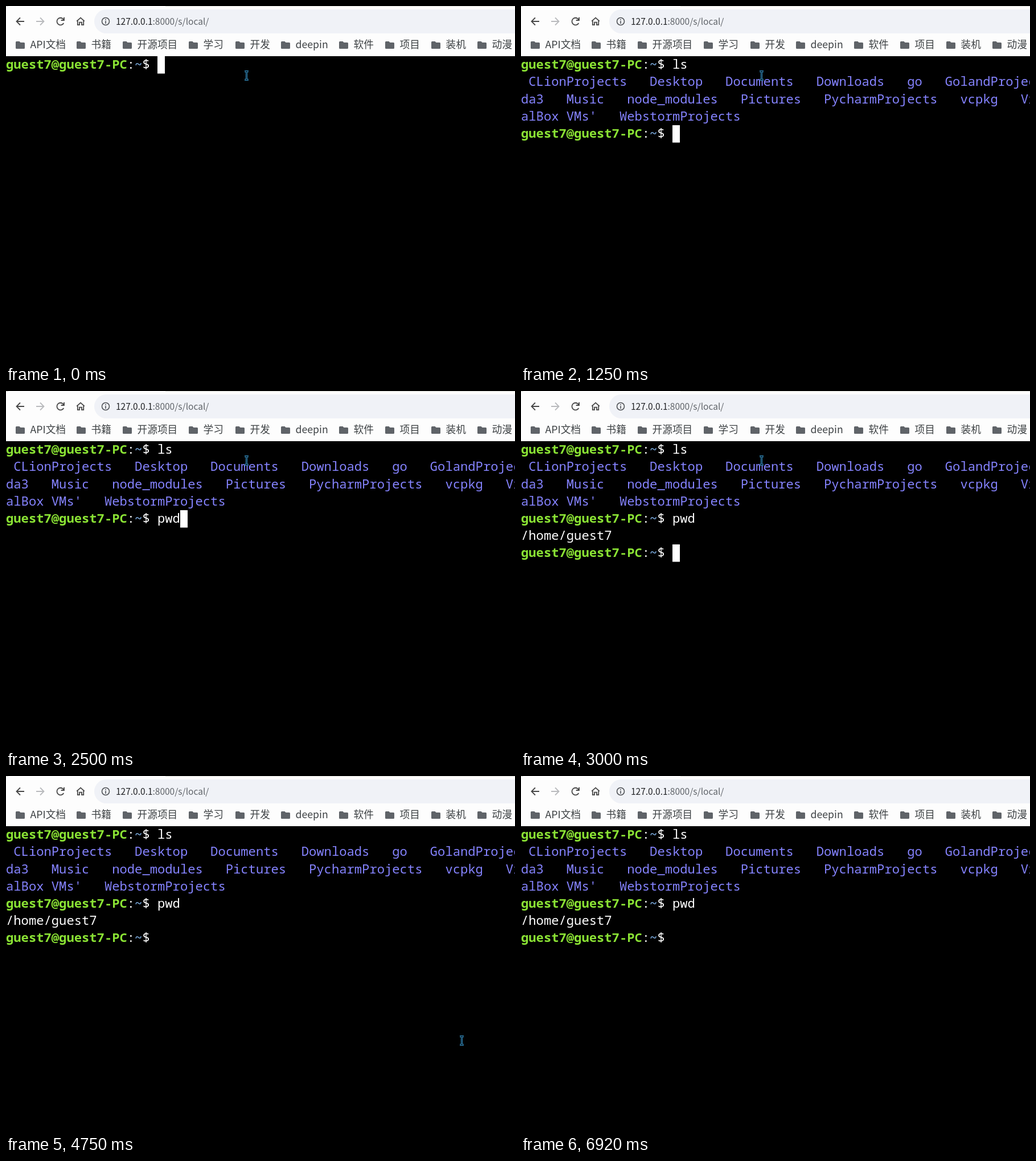
These frames come from a looping animation (894x626 px, 7260 ms). An HTML page with a canvas:

```html
<!DOCTYPE html>
<html lang="zh-CN">
<head>
<meta charset="utf-8">
<title>Terminal</title>
<style>
  html, body { margin: 0; width: 100%; height: 100%; overflow: hidden; background: #000; }
  canvas { display: block; }
</style>
</head>
<body>
<canvas id="stage" width="894" height="626"></canvas>
<script>
const ctx = document.getElementById('stage').getContext('2d');
const LOOP = 7260;
const CELL = 13.3, ROW = 30.17, TOP = 88.2;
const UI_FONT = '"Noto Sans CJK SC", "Noto Sans CJK", "Noto Sans", sans-serif';
const MONO_FONT = '22.17px "Noto Sans Mono", monospace';
const WHITE = '#fff', GREEN = '#8ae234', BLUE = '#729fcf', VIOLET = '#8583ff', GREY = '#5f6368';

const BOOKMARKS = [
  [17, 'API文档'], [124, '书籍'], [205, '开源项目'], [321, '学习'], [403, '开发'],
  [483, 'deepin'], [585, '软件'], [666, '项目'], [747, '装机'], [828, '动漫']
];
const LISTING = [
  ' CLionProjects   Desktop   Documents   Downloads   go   GolandProjec',
  'da3   Music   node_modules   Pictures   PycharmProjects   vcpkg   Vi',
  "alBox VMs'   WebstormProjects"
];

// Keyboard events; '\n' runs the current command.
const KEYS = [[920, 'l'], [1080, 's'], [1250, '\n'], [2250, 'p'], [2330, 'w'], [2500, 'd'], [2750, '\n']];
const OUTPUT = {
  ls: LISTING.map(line => [line, VIOLET]),
  pwd: [['/home/guest7', WHITE]]
};
// Moments at which the idle block cursor toggles.
const BLINKS = [1830, 2250, 3330, 3920, 4500, 5080, 5670, 6330, 6920];
// Mouse path: time, x, y.
const MOUSE = [[4420, 422, 122], [4750, 800, 464], [5000, 885, 501]];
const MOUSE_GONE = 5080;

function stroke(path, color = '#474747', width = 1.8) {
  ctx.strokeStyle = color;
  ctx.lineWidth = width;
  ctx.stroke(new Path2D(path));
}

function label(text, x, y, size, color) {
  ctx.font = `${size}px ${UI_FONT}`;
  ctx.fillStyle = color;
  ctx.fillText(text, x, y);
}

function drawFolder(x) {
  ctx.fillStyle = GREY;
  ctx.fill(new Path2D(`M${x + 1.5} 62h5l2 2h6q1.5 0 1.5 1.5v8q0 1.5-1.5 1.5h-13q-1.5 0-1.5-1.5v-10q0-1.5 1.5-1.5z`));
}

function drawBrowser() {
  ctx.fillStyle = '#fdfdfd';
  ctx.fillRect(0, 0, 894, 88);
  ctx.fillStyle = '#dcdfd8';
  ctx.fillRect(280, 0, 614, 1);
  ctx.fillRect(0, 0, 4, 1);
  ctx.fillStyle = '#f0f2f7';
  ctx.beginPath();
  ctx.roundRect(155, 6, 800, 42, 21);
  ctx.fill();

  stroke('M32 27H18.5M25 20.5L18.5 27L25 33.5');
  stroke('M53 27H66.5M60 20.5L66.5 27L60 33.5', '#b9babd');
  stroke('M101.3 30A6.3 6.3 0 1 1 100.2 22.6L101.8 24.5M102 19.8V25H96.7');
  stroke('M125.8 25.5V33.2H129V28.6H133V33.2H136.2V25.5M124.2 26.6L131 20.6L137.8 26.6');
  stroke('M181.5 27A6.5 6.5 0 1 1 168.5 27A6.5 6.5 0 1 1 181.5 27M175 26V31M175 23V24.7', '#505357', 1.6);

  label('127.0.0.1', 193, 33, 15.5, '#1f2023');
  label(':8000/s/local/', 257.5, 33, 15.5, GREY);
  for (const [x, name] of BOOKMARKS) {
    drawFolder(x);
    label(name, x + 25.5, 74, 17.7, '#3c4043');
  }
}

// Draws one character per cell and returns the next free column.
function print(text, col, row, color, bold = false) {
  ctx.font = (bold ? 'bold ' : '') + MONO_FONT;
  ctx.fillStyle = color;
  const y = Math.round(TOP + row * ROW + 22);
  for (const char of text) ctx.fillText(char, col++ * CELL, y);
  return col;
}

function prompt(row) {
  let col = print('guest7@guest7-PC', 0, row, GREEN, true);
  col = print(':', col, row, WHITE);
  col = print('~', col, row, BLUE, true);
  return print('$ ', col, row, WHITE);
}

function drawTerminal(t) {
  let row = 0, command = '';
  let col = prompt(row);
  for (const [time, key] of KEYS) {
    if (t < time) break;
    if (key === '\n') {
      for (const [text, color] of OUTPUT[command]) print(text, 0, ++row, color);
      col = prompt(++row);
      command = '';
    } else {
      col = print(key, col, row, WHITE);
      command += key;
    }
  }
  const toggles = BLINKS.filter(time => time <= t).length;
  if (toggles % 2 === 0) {
    ctx.fillStyle = WHITE;
    ctx.fillRect(Math.round(col * CELL), Math.round(TOP + row * ROW), 13, 30.5);
  }
}

function mouseAt(t) {
  let [start, x, y] = MOUSE[0];
  for (const [end, nextX, nextY] of MOUSE.slice(1)) {
    const p = Math.min(1, Math.max(0, (t - start) / (end - start)));
    x += (nextX - x) * p;
    y += (nextY - y) * p;
    start = end;
  }
  return [x, y];
}

function drawMouse(t) {
  if (t >= MOUSE_GONE) return;
  const [x, y] = mouseAt(t).map(Math.round);
  const beam = `M${x - 3} ${y - 7.5}h7M${x - 3} ${y + 7.5}h7M${x + 0.5} ${y - 7}v14`;
  stroke(beam, '#3a9fd8', 3);
  stroke(beam, '#000', 1);
}

function frame(now) {
  const t = now % LOOP;
  ctx.fillStyle = '#000';
  ctx.fillRect(0, 0, 894, 626);
  drawBrowser();
  drawTerminal(t);
  drawMouse(t);
  requestAnimationFrame(frame);
}
requestAnimationFrame(frame);
</script>
</body>
</html>
```
